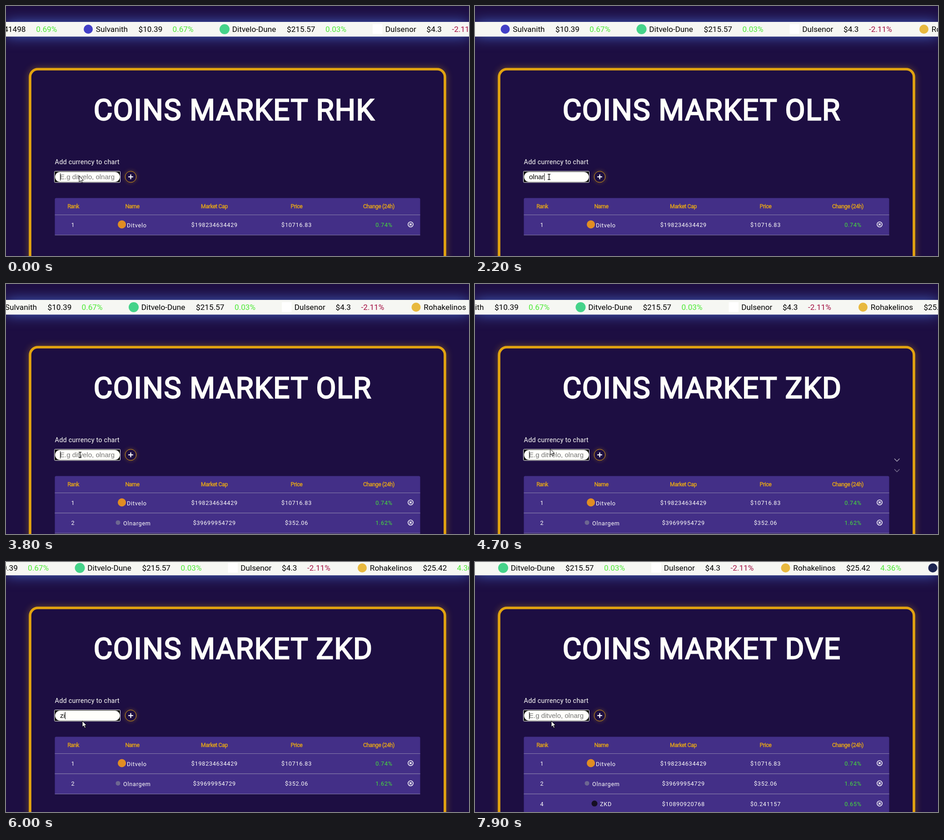
An HTML page that plays this animation: 1019 px wide and 550 px high, repeating every 8000 ms.

```html
<!DOCTYPE html>
<html lang="en">
<head>
<meta charset="utf-8">
<title>Coins Market</title>
<style>
  html, body { margin: 0; width: 100%; height: 100%; overflow: hidden; background: #1d0e42; }
  svg { display: block; width: 1019px; height: 550px; font-family: Roboto, sans-serif; }
  text { white-space: pre; }
  .bar { fill: #f6f7f3; filter: drop-shadow(0 0 15px #4361c4); }
  .card { fill: #1d0e42; stroke: #e2a310; stroke-width: 5.6; filter: drop-shadow(0 0 8px rgba(226, 163, 16, .4)); }
  .tick { font-size: 17.2px; }
  .title { font-size: 64px; letter-spacing: 1.5px; fill: #fffffb; stroke: #fffffb; stroke-width: 2.4px; }
  .label { font-size: 14.4px; letter-spacing: .25px; fill: #fffffb; }
  .field { font: 15px "Liberation Sans", Arial, sans-serif; }
  .head { font-size: 12.4px; letter-spacing: -.45px; fill: #e2a31a; stroke: #e2a31a; stroke-width: .45px; text-anchor: middle; }
  .cell { font-size: 12.7px; letter-spacing: .73px; fill: #fffffb; }
  .mid { text-anchor: middle; }
  .add { fill: #1d0e42; stroke: #e2a310; stroke-width: 1; filter: drop-shadow(0 0 5px rgba(226, 163, 16, .35)); }
  .line { stroke: #fff; fill: none; }
</style>
</head>
<body>
<svg id="stage" viewBox="0 0 1019 550"></svg>
<script>
const LOOP = 8000, STEP = 100;
const UP = '#4cea35', DOWN = '#a30d40';
const TABLE_Y = 459.5, ROW = 44.4;

// Ticker entries: left edge, icon colour, name, price and its offset, change and its offset
const coins = [
  [0, '#423fc6', 'Sulvanith', '$10.39', 121.5, '0.67%', 196.5],
  [300, '#45d38a', 'Ditvelo-Dune', '$215.57', 148, '0.03%', 233],
  [637, '#ffffff', 'Dulsenor', '$4.3', 118.5, '-2.11%', 174.5],
  [921.5, '#e8b93f', 'Rohakelinos', '$25.42', 144.5, '4.36%', 219.5],
  [1245.5, '#1c2450', '', '', 0, '', 0]
];
// Table rows: cells, then icon colour, icon centre, icon radius and name position
const rows = [
  ['1', 'Ditvelo', '$198234634429', '$10716.83', '0.74%', '#e18d22', 255, 9, 266],
  ['2', 'Olnargem', '$39699954729', '$352.06', '1.62%', '#6d6791', 246.5, 5, 258],
  ['4', 'ZKD', '$10890920768', '$0.241157', '0.65%', '#150f22', 263, 6.5, 275]
];
const rowTimes = [0, 3400, 7500];
const words = ['RHK', 'OLR', 'ZKD', 'DVE'];
const SWAP = 1400, HOLD = 2500;

const typed = [[0, '']];
function type(word, times, clear) {
  times.forEach((t, i) => typed.push([t, word.slice(0, i + 1)]));
  typed.push([clear, '']);
}
type('olnargem', [700, 900, 1100, 1700, 2000, 2300, 2500, 2700], rowTimes[1]);
type('zilked', [5700, 5900, 6100, 6300, 6500, 6700], rowTimes[2]);

// Tables of [time, value]
const tickerX = [[0, 170], [1300, 103], [2200, 55.5], [3800, -30], [5200, -105.5], [6800, -191.5], [7900, -249]];
const scrollY = [[4700, 0], [4900, 38]];
const mouseX = [[0, 161], [200, 163], [4600, 163], [4800, 168]];
const mouseY = [[0, 374], [200, 376], [4600, 376], [4800, 350]];

function track(keys, t) {
  if (t <= keys[0][0]) return keys[0][1];
  for (let i = 1; i < keys.length; i++) {
    const [t0, a] = keys[i - 1], [t1, b] = keys[i];
    if (t <= t1) return a + (b - a) * (t - t0) / (t1 - t0);
  }
  return keys[keys.length - 1][1];
}

const text = (cls, x, y, str, extra = '') => `<text class="${cls}" x="${x}" y="${y}" ${extra}>${str}</text>`;
const fill = c => `fill="${c}"`;
const dot = (x, y, r, c) => `<circle cx="${x}" cy="${y}" r="${r}" ${fill(c)}/>`;

function coin([x, color, name, price, px, change, cx]) {
  const icon = color === '#ffffff'
    ? `<rect x="${x}" y="40" width="21.5" height="21.5" ${fill(color)}/>`
    : dot(x + 11, 51, color === '#45d38a' ? 11 : 10, color);
  return icon + text('tick', x + 27.8, 57, name) + text('tick', x + px, 57, price) +
    text('tick', x + cx, 57, change, fill(change[0] === '-' ? DOWN : UP));
}

function row([rank, name, cap, price, change, color, ix, r, nx], i) {
  const y = TABLE_Y + i * ROW, base = y + 26.3;
  return `<g id="row${i}">
    <rect x="107.5" y="${y}" width="804" height="${ROW}" fill="#432f87"/>
    <path d="M107.5 ${y}h804m0 ${ROW}h-804" stroke="#8a80ad"/>
    ${text('cell mid', 147.4, base, rank)}
    ${dot(ix, y + 21, r, color)}
    ${text('cell', nx, base + .7, name)}
    ${text('cell mid', 458.8, base, cap)}
    ${text('cell mid', 639.6, base, price)}
    ${text('cell mid', 832, base, change, 'style="fill:#45e03a"')}
    <g class="line" stroke-width="1.5"><circle cx="890.5" cy="${y + 21}" r="5.6"/>
    <path d="M888.3 ${y + 18.8}l4.4 4.4m0 -4.4l-4.4 4.4" stroke-width="1.9"/></g>
  </g>`;
}

const heads = [['Rank', 148], ['Name', 278], ['Market Cap', 458.5], ['Price', 639.5], ['Change (24h)', 820.5]];

document.getElementById('stage').innerHTML = `
<g id="page">
  <rect class="bar" y="35" width="1019" height="32.3"/>
  <g id="ticker">
    ${text('tick', -126.5, 57, '$0.241498', 'text-anchor="end"')}
    ${text('tick', -103.8, 57, '0.69%', fill(UP))}
    ${coins.map(coin).join('')}
  </g>
  <rect class="card" x="53" y="139" width="913" height="700" rx="17"/>
  ${text('title', 192.7, 250.5, 'COINS MARKET')}
  ${text('title', 682.5, 250.5, '', 'id="oldWord"')}
  ${text('title', 682.5, 250.5, '', 'id="newWord"')}
  ${text('label', 107.5, 348, 'Add currency to chart')}
  <rect x="106.5" y="363.5" width="145" height="24.7" rx="2" fill="#101010" class="ring" stroke="#fff"/>
  <rect x="108" y="365" width="142.5" height="22" rx="11" fill="#fffffb"/>
  ${text('field', 119, 381, '', 'id="entry"')}
  <path id="caret" d="M0 368v16" stroke="#000"/>
  <circle class="add" cx="274.5" cy="375.8" r="12.2"/>
  <path class="line" d="M270 375.8h9m-4.5 -4.5v9" stroke-width="2.2" stroke-linecap="round"/>
  <path d="M107.500 460v-34.500a3 3 0 0 1 3 -3h798a3 3 0 0 1 3 3v34.500z" fill="#432f87"/>
  ${heads.map(([s, x]) => text('head', x, 444.8, s)).join('')}
  ${rows.map(row).join('')}
  <g id="chevrons" class="line" stroke-width="1.4" stroke-opacity=".75">
    ${[0, 1, 2].map(i => `<path d="M923 ${362 + i * 23.3}l5.7 5.7l5.7 -5.7"/>`).join('')}
  </g>
</g>
<path id="arrow" d="M0 0v13l3.1 -2.8l2.2 5l2.2 -1l-2.2 -4.8h4.2z" fill="#fff" stroke="#000"/>
<path id="beam" d="M-3 -6h2q1 0 1 1q0 -1 1 -1h2M0 -5v10M-3 6h2q1 0 1 -1q0 1 1 1h2" fill="none" stroke="#111" stroke-width="1.4"/>`;

const $ = id => document.getElementById(id);
const move = (id, x, y) => $(id).setAttribute('transform', `translate(${x} ${y})`);
const show = (id, on) => $(id).setAttribute('visibility', on ? 'visible' : 'hidden');

function drawWords(t) {
  const n = Math.floor((t - SWAP) / HOLD) + 1;
  const age = n > 0 ? t - SWAP - (n - 1) * HOLD : LOOP;
  const slide = 1 - (1 - Math.min(1, age / 350)) ** 2;
  $('newWord').textContent = words[n];
  $('oldWord').textContent = n > 0 ? words[n - 1] : '';
  move('newWord', 0, -73 * (1 - slide));
  move('oldWord', 0, 73 * slide);
  $('newWord').setAttribute('opacity', slide);
  $('oldWord').setAttribute('opacity', Math.max(0, 1 - age / 520));
}

function drawField(t) {
  const [since, value] = typed.filter(k => k[0] <= t).pop();
  const entry = $('entry');
  entry.textContent = value || 'E.g ditvelo, olnarg';
  entry.setAttribute('fill', value ? '#000' : '#757575');
  move('caret', 119.5 + (value ? entry.getComputedTextLength() : 0), 0);
  show('caret', (t - since) % 1000 < 500);
}

function drawChevrons(t, count) {
  move('chevrons', 0, (count - 1) * ROW / 2);
  [...$('chevrons').children].forEach((c, i) => {
    const p = t % 2000 - 250 - i * 250;
    c.setAttribute('opacity', Math.max(0, Math.min(p / 380, (830 - p) / 450)));
  });
}

function draw(t) {
  const count = rowTimes.filter(r => r <= t).length;
  rows.forEach((_, i) => show('row' + i, i < count));
  move('page', 0, -track(scrollY, t));
  move('ticker', track(tickerX, t), 0);
  drawWords(t);
  drawField(t);
  drawChevrons(t, count);
  const beam = t >= 200 && t < 4600;
  show('beam', beam);
  show('arrow', !beam);
  move(beam ? 'beam' : 'arrow', track(mouseX, t), track(mouseY, t));
}

const start = performance.now();
function tick() {
  const t = (performance.now() - start + 20) % LOOP;
  draw(Math.floor(t / STEP) * STEP);
  requestAnimationFrame(tick);
}
tick();
</script>
</body>
</html>
```
